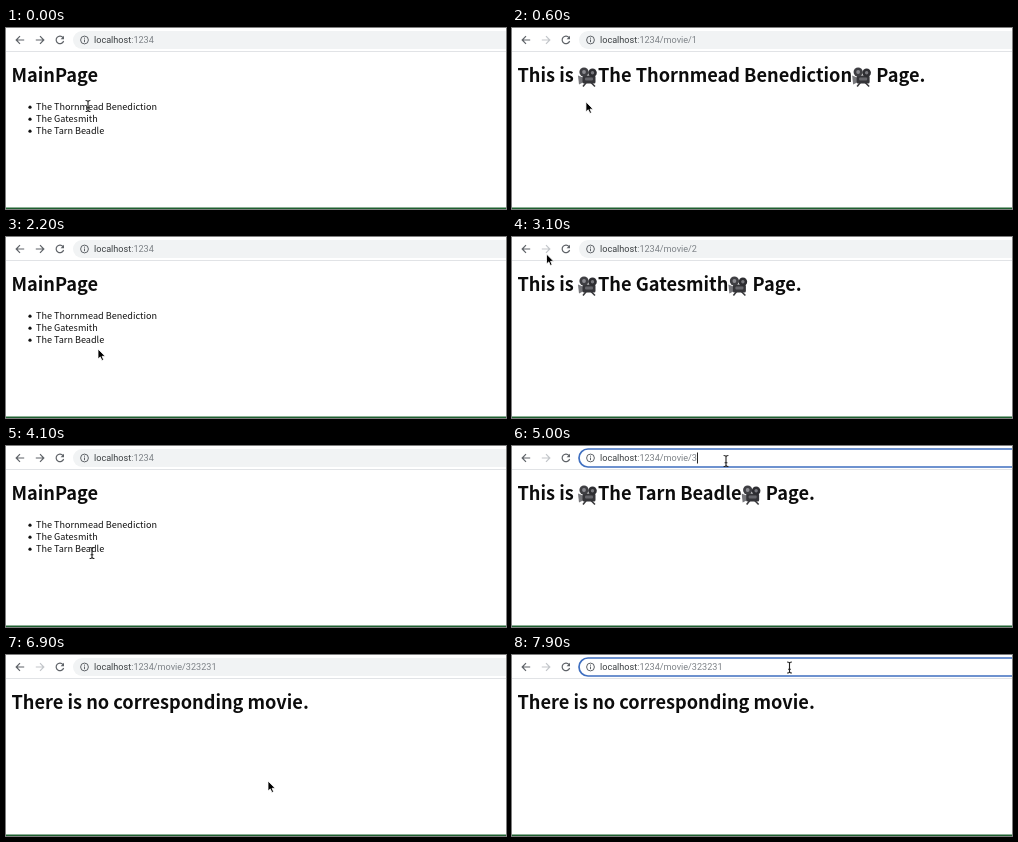
An HTML page that plays this animation: 500x181 px, repeating every 8 s.

```html
<!DOCTYPE html>
<html lang="en">
<head>
<meta charset="utf-8">
<title>Movie pages</title>
<style>
html, body { margin: 0; width: 100%; height: 100%; overflow: hidden; background: #fff; }
svg { display: block; width: 500px; height: 181px; }
text { white-space: pre; }
.page { font-family: "Noto Sans CJK KR", "Noto Sans", sans-serif; font-size: 9.1px; fill: #111; }
.head { font-size: 18.2px; font-weight: 700; fill: #0c0c0c; }
.url { font-family: Roboto, "Noto Sans CJK KR", sans-serif; font-size: 9.1px; fill: #3c4043; }
.dim { fill: #7d8287; }
.icon { fill: none; stroke: #5f6368; stroke-width: 1.2; }
</style>
</head>
<body>
<svg viewBox="0 0 500 181">
  <defs>
    <g id="camera">
      <path d="M9 15 L5 20 M12 15 L17 20" stroke="#3a3a3d" stroke-width="1.6"/>
      <path d="M0 9 L5 11 V16 L1 18 Z" fill="#77777b"/>
      <rect x="4.5" y="9" width="13" height="8" rx="1.5" fill="#343438"/>
      <rect x="7" y="11" width="8" height="3" rx="1" fill="#66666b"/>
      <circle cx="6" cy="5.5" r="4.6" fill="#3f3f43"/>
      <circle cx="14.5" cy="6.2" r="4.3" fill="#2d2d31"/>
      <circle cx="6" cy="5.5" r="1.9" fill="#8b8b90"/>
      <circle cx="14.5" cy="6.2" r="1.7" fill="#77777c"/>
    </g>
    <g id="globe">
      <circle r="4.2" fill="#5f6368"/>
      <path d="M-3 -1.6 L-.6 -2.6 L.4 -.8 L-1.2 .4 L-.8 2.6 L-2.4 1.4 Z M1.2 .2 L3 -.6 L2.4 2 L1 2.4 Z" fill="#f3f4f5"/>
    </g>
    <filter id="shadow" x="-10%" y="-10%" width="120%" height="130%">
      <feDropShadow dx="0" dy="2" stdDeviation="2.5" flood-color="#000" flood-opacity=".32"/>
    </filter>
  </defs>

  <rect width="500" height="181" fill="#fff"/>
  <path d="M0 23.5 H500" stroke="#e1e3e6"/>
  <rect y="179.5" width="500" height="1.5" fill="#1e6030"/>

  <g class="page">
    <text id="head" class="head" x="5.5" y="54"></text>
    <g id="film">
      <use href="#camera" x="66" y="38.5"/>
      <text id="title" class="head" x="86" y="54"></text>
      <use id="camera2" href="#camera" y="38.5"/>
      <text id="tail" class="head" y="54"> Page.</text>
    </g>
    <g id="list"></g>
  </g>

  <circle id="hover" cy="12" r="8.5" fill="#e6e8ea"/>
  <g class="icon">
    <path d="M18.2 12 H10.4 M14 8.2 L10.2 12 L14 15.8"/>
    <path id="forward" d="M29.8 12 H37.6 M34 8.2 L37.8 12 L34 15.8"/>
    <path d="M57 9.6 A3.8 3.8 0 1 0 57.6 13"/>
    <path d="M58 7.8 V11.2 H54.6 Z" fill="#5f6368" stroke="none"/>
  </g>

  <rect id="bar" x="67" y="3" width="460" height="18" rx="9"/>
  <g id="info" class="icon">
    <circle cx="78.5" cy="12" r="3.9" stroke-width="1"/>
    <path d="M78.5 11.5 V14.2 M78.5 9.6 V10.7" stroke-width="1"/>
  </g>

  <g id="drop">
    <rect x="64" y="2" width="450" height="71" rx="4" fill="#fff" filter="url(#shadow)"/>
    <rect x="64" y="23" width="436" height="22" fill="#e8e8ea"/>
    <rect x="64" y="23" width="2.5" height="22" fill="#2f66d0"/>
    <use href="#globe" x="78.5" y="12"/>
    <use href="#globe" x="78.5" y="34"/>
    <g class="icon">
      <circle cx="77.6" cy="56" r="2.7"/>
      <path d="M79.6 58 L82.4 60.8"/>
    </g>
    <text id="pick" class="url" x="95" y="37.3" style="font-weight:700;fill:#2c60c4"></text>
    <text class="url" x="95" y="59.8"><tspan id="query"></tspan><tspan fill="#6b7075"> – Yondle 검색</tspan></text>
  </g>

  <rect id="mark" x="88" y="6.5" height="11.5" fill="#b4d2fb"/>
  <text id="url" class="url" y="15.2"><tspan id="host">localhost</tspan><tspan id="path"></tspan></text>
  <rect id="caret" y="6.5" width="1" height="11" fill="#222"/>

  <path id="arrow" d="M0 0 V10 L2.3 7.9 L3.9 11.5 L5.6 10.8 L4.1 7.3 H7.2 Z" fill="#000" stroke="#fff" stroke-width=".8"/>
  <g id="beam" fill="none">
    <path d="M-2.4 -5.5 Q0 -5.5 0 -4 Q0 -5.5 2.4 -5.5 M0 -4 V4 M-2.4 5.5 Q0 5.5 0 4 Q0 5.5 2.4 5.5 M-1.4 1.8 H1.4" stroke="#222" stroke-width="1.1"/>
  </g>
</svg>

<script>
const LOOP = 8000, STEP = 100;
const $ = id => document.getElementById(id);
const show = (id, on) => $(id).setAttribute("display", on ? "inline" : "none");
const put = (id, attrs) => { for (const k in attrs) $(id).setAttribute(k, attrs[k]); };

const films = ["The Thornmead Benediction", "The Gatesmith", "The Tarn Beadle"];

// time, page, path
const scenes = [
  [0, "main", ""],
  [300, "load", "/movie/1"],
  [500, 0, "/movie/1"],
  [1300, "load", ""],
  [1500, "main", ""],
  [2600, "load", "/movie/2"],
  [2800, 1, "/movie/2"],
  [3400, "load", ""],
  [3600, "main", ""],
  [4300, "load", "/movie/3"],
  [4500, 2, "/movie/3"],
  [5300, 2, "/movie/32"],
  [5800, 2, "/movie/323"],
  [5900, 2, "/movie/3232"],
  [6000, 2, "/movie/323231"],
  [6200, "load", "/movie/323231"],
  [6400, "none", "/movie/323231"]
];

// time, x, y of the mouse
const moves = [
  [0, 82, 78], [300, 79, 80], [500, 78, 79], [900, 52, 46], [1200, 16, 14],
  [1300, 14, 12], [1400, 14, 12], [1700, 110, 62], [1900, 206, 104],
  [2200, 92, 112], [2300, 92, 112], [2500, 76, 92], [2700, 75, 91],
  [3000, 48, 3], [3100, 34.5, 17], [3300, 15, 12], [3500, 15, 12],
  [3800, 98, 128], [4100, 86, 107], [4300, 84, 106], [4450, 85, 104],
  [4800, 208, 14], [5000, 214, 15], [5300, 242, 15], [6500, 242, 15],
  [6900, 262, 126], [7000, 264, 126], [7300, 276, 14], [7400, 277.5, 12.5], [8000, 277.5, 12.5]
];

films.forEach((name, i) => {
  const y = 82.4 + 12 * i;
  $("list").innerHTML += `<circle cx="24" cy="${y - 3.2}" r="1.6"/><text x="30" y="${y}">${name}</text>`;
});

function mouseAt(t) {
  const i = moves.findIndex(m => m[0] > t);
  const [t0, x0, y0] = moves[i - 1], [t1, x1, y1] = moves[i];
  const p = (t - t0) / (t1 - t0), e = p * p * (3 - 2 * p);
  return [x0 + (x1 - x0) * e, y0 + (y1 - y0) * e];
}

function drawPage(page) {
  const film = typeof page === "number";
  const heads = { main: "MainPage", load: "loading...", none: "There is no corresponding movie." };
  $("head").textContent = film ? "This is" : heads[page];
  show("list", page === "main");
  show("film", film);
  let end = 5.5 + $("head").getComputedTextLength();
  if (film) {
    $("title").textContent = films[page];
    const x = 86 + $("title").getComputedTextLength();
    put("camera2", { x });
    put("tail", { x: x + 20 });
    end = x + 70;
  }
  return end;
}

function drawBar(t, path) {
  const focus = t >= 4800 && t < 6200 || t >= 7300;
  const drop = t >= 5500 && t < 6200;
  const typed = t >= 5300 && t < 6200;
  const marked = t >= 4800 && t < 5000 || t >= 7300 && t < 7500;
  const x = drop ? 95 : 88;

  put("bar", focus
    ? { fill: "#fff", stroke: "#3f6fc0", "stroke-width": 1.7 }
    : { fill: "#f1f3f4", stroke: "none" });
  show("drop", drop);
  show("info", !drop);

  $("path").textContent = ":1234" + path;
  $("path").setAttribute("class", typed ? "" : "dim");
  put("url", { x });
  const width = $("url").getComputedTextLength();
  put("mark", { width });
  show("mark", marked);
  put("caret", { x: x + width });
  show("caret", focus && !marked && t < 7900);
  $("pick").textContent = $("query").textContent = "localhost:1234" + path;
}

function drawMouse(t, page, headEnd) {
  const [x, y] = mouseAt(t);
  const overBar = x > 88 && y > 4 && y < 20;
  const overHead = x > 5 && x < headEnd && y > 38 && y < 59;
  const overList = page === "main" && x > 30 && x < 98 && y > 73 && y < 110;
  const beam = overBar || overHead || overList;
  show("beam", beam);
  show("arrow", !beam);
  put(beam ? "beam" : "arrow", { transform: `translate(${x} ${y})` });
  show("hover", Math.hypot(x - 14, y - 12) < 8);
  put("hover", { cx: 14 });
}

function draw(time) {
  const t = Math.floor((time % LOOP) / STEP) * STEP;
  const [, page, path] = scenes.filter(s => s[0] <= t).pop();
  const headEnd = drawPage(page);
  drawBar(t, path);
  put("forward", { stroke: path ? "#c3c6ca" : "#5f6368" });
  drawMouse(t, page, headEnd);
}

const start = performance.now();
function tick() {
  draw(performance.now() - start);
  requestAnimationFrame(tick);
}
tick();
</script>
</body>
</html>
```
